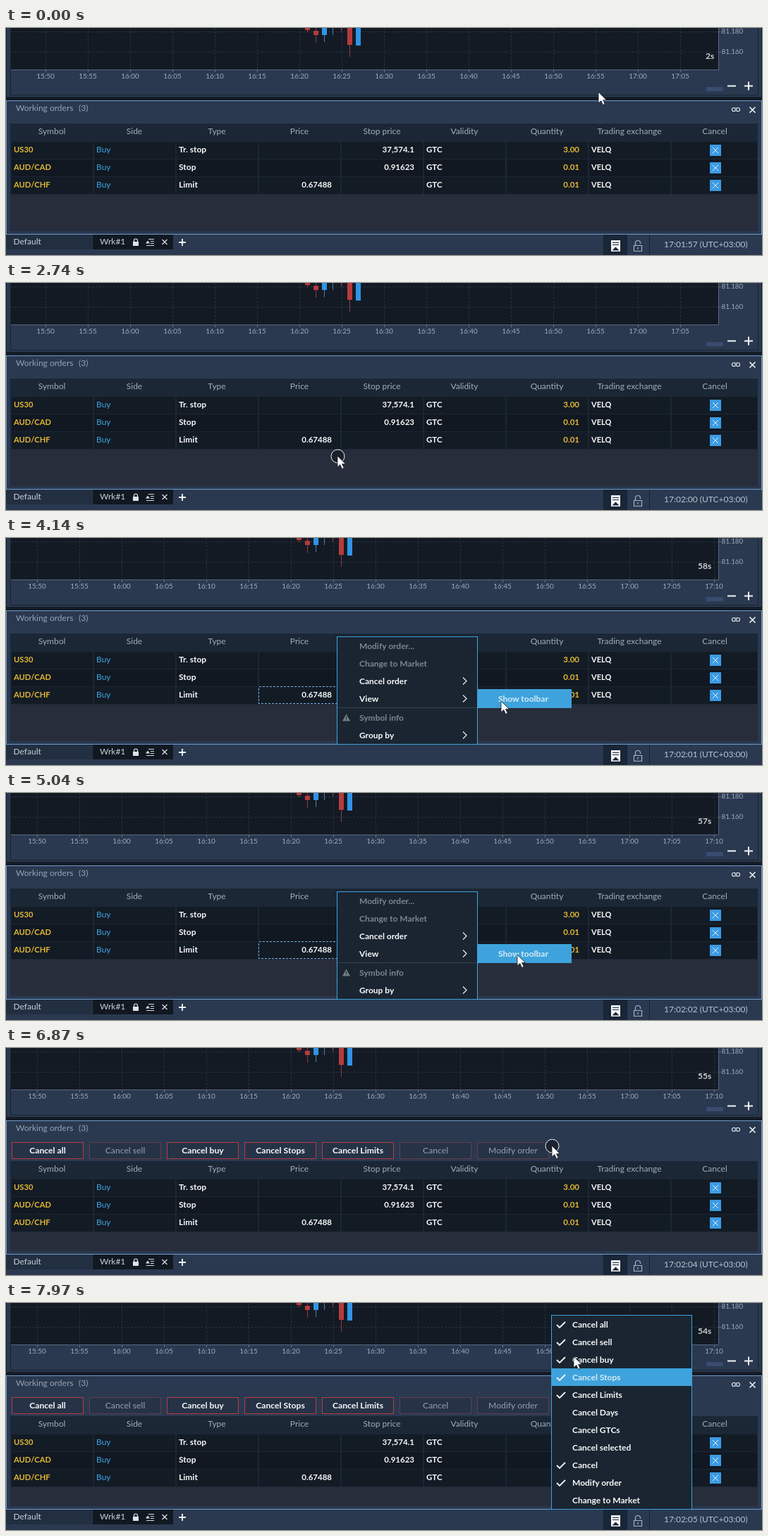
These frames come from a looping animation (1072x323 px, 8000 ms). An HTML page:

```html
<!DOCTYPE html>
<html lang="en">
<head>
<meta charset="utf-8">
<title>Working orders</title>
<style>
  html, body { margin: 0; width: 100%; height: 100%; overflow: hidden; background: #2a3950; }
  svg { display: block; width: 1072px; height: 323px; }
  text { font: 12px Lato, "Open Sans", sans-serif; white-space: pre; }
  rect { shape-rendering: crispEdges; }
</style>
</head>
<body>
<svg id="stage" viewBox="0 0 1072 323"></svg>
<script>
const LOOP = 8000;
const stage = document.getElementById('stage');

function add(parent, tag, attrs) {
  const el = document.createElementNS('http://www.w3.org/2000/svg', tag);
  for (const k in attrs) el.setAttribute(k, attrs[k]);
  parent.appendChild(el);
  return el;
}
const group = (parent = stage) => add(parent, 'g', {});
const rect = (p, x, y, width, height, fill, more) => add(p, 'rect', { x, y, width, height, fill, ...more });
const box = (p, x, y, w, h, fill, stroke, more) => rect(p, x + .5, y + .5, w - 1, h - 1, fill, { stroke, ...more });
const path = (p, d, stroke, width = 1, more) =>
  add(p, 'path', { d, stroke, 'stroke-width': width, fill: 'none', ...more });
const shape = (p, d, fill) => add(p, 'path', { d, fill });
function text(p, str, x, y, fill, { bold, size = 12, anchor = 'start' } = {}) {
  const el = add(p, 'text', { x, y, fill, 'text-anchor': anchor });
  el.style.fontSize = size + 'px';
  if (bold) el.style.fontWeight = 700;
  el.textContent = str;
  return el;
}
const cross = (p, x, y, r, color, w) =>
  path(p, `M${x - r} ${y - r}l${2 * r} ${2 * r}m0 ${-2 * r}l${-2 * r} ${2 * r}`, color, w);
const plus = (p, x, y, r, w) => path(p, `M${x - r} ${y}h${2 * r}M${x} ${y - r}v${2 * r}`, '#f2f5f8', w);
const show = (el, on) => { el.style.display = on ? '' : 'none'; };
const between = (t, a, b) => t >= a && t < b;

// Chart
const AXIS = '#a0abb8', GRID = '#26333b';
const chart = group();
box(chart, 0, -2, 1072, 101, '#2a3950', '#141b25');
path(chart, 'M6.5 0V95.5H1066.5V0', '#192431');
rect(chart, 7, 0, 1003, 59, '#131a24');
const clip = add(stage, 'clipPath', { id: 'plot' });
rect(clip, 7, 0, 1003, 59, '#fff');
path(chart, 'M7 5.5H1010M7 34.5H1010', GRID, 1, { 'stroke-dasharray': '3 2' });
const plot = group(add(chart, 'g', { 'clip-path': 'url(#plot)' }));
const axis = group(chart);
let lastLabel;
for (let i = 0; i <= 16; i++) {
  const x = 56 + 60 * i, min = 950 + 5 * i;
  path(plot, `M${x + .5} 0V60`, GRID, 1, { 'stroke-dasharray': '3 2' });
  lastLabel = group(axis);
  path(lastLabel, `M${x + .5} 60v3`, '#65758a');
  const label = Math.floor(min / 60) + ':' + String(min % 60).padStart(2, '0');
  text(lastLabel, label, x, 72, AXIS, { size: 10, anchor: 'middle' });
}
const RED = '#b63b3c', BLUE = '#3094e6';
// centre x, body top, body bottom, wick bottom, colour
for (const [x, top, bottom, low, color] of [
  [427, -5, 3, 6, RED], [439, 4, 10, 21, RED], [451, -5, 10, 20, BLUE], [463, -5, -1, 10, BLUE],
  [475, -5, -1, 5, RED], [487, -5, 24, 41, RED], [499, -5, 25, 25, BLUE]]) {
  path(plot, `M${x + .5} 0V${low}`, color === RED ? '#8f3d42' : '#4480b3');
  rect(plot, x - 3, top, 7, bottom - top, color);
}
path(chart, 'M7 59.5H1010.5V0M1010 5.5h4M1010 34.5h4', '#59687b');
text(chart, '81.180', 1014.5, 7.5, AXIS, { size: 9.8 });
text(chart, '81.160', 1014.5, 36.5, AXIS, { size: 9.8 });
const timer = text(chart, '', 992, 44, '#cdd2d8', { bold: true });
rect(chart, 993, 84, 24, 6, '#3a4b70');
path(chart, 'M1023 82.5h12', '#f2f5f8', 2);
plus(chart, 1053, 82.5, 6, 2);
rect(chart, 0, 98, 1072, 5, '#141b25');

// Orders panel
const panel = group();
box(panel, 0, 103, 1072, 191, '#2a3950', '#6f9ccb');
text(panel, 'Working orders', 14, 118, '#97a3b2');
text(panel, '(3)', 103, 118, '#97a3b2');
path(panel, 'M1034 113.5h-2a2.5 2.5 0 0 0 0 5h2M1036 113.5h2a2.5 2.5 0 0 1 0 5h-2M1034 113.5v5M1036 113.5v5', '#e3e8ee', 1.2);
cross(panel, 1058.5, 116.5, 4, '#f2f5f8', 1.6);
rect(panel, 6, 136, 1060, 153, '#282d3b');

const toolbar = group();
rect(toolbar, 6, 132, 1060, 30, '#2a3950');
['Cancel all', 'Cancel sell', 'Cancel buy', 'Cancel Stops', 'Cancel Limits', 'Cancel', 'Modify order'].forEach((name, i) => {
  const off = i === 1 || i > 4, x = 8 + 110 * i;
  box(toolbar, x, 134, 102, 24, '#263347', off ? '#683c4a' : '#b93b40', { rx: 1 });
  text(toolbar, name, x + 51, 150, off ? '#959fac' : '#f8f9fa', { bold: !off, anchor: 'middle', size: 12.2 });
});

const table = group();
const edges = [7, 124, 241, 358, 475, 592, 709, 826, 943, 1066];
rect(table, 6, 136, 1060, 101, '#1b2735');
['Symbol', 'Side', 'Type', 'Price', 'Stop price', 'Validity', 'Quantity', 'Trading exchange', 'Cancel'].forEach((name, i) =>
  text(table, name, (edges[i] + edges[i + 1]) / 2 + (i < 8 ? -.5 : .5), 151, '#a2adba', { anchor: 'middle' }));
[['US30', 'Tr. stop', '', '37,574.1', '3.00'],
 ['AUD/CAD', 'Stop', '', '0.91623', '0.01'],
 ['AUD/CHF', 'Limit', '0.67488', '', '0.01']].forEach(([symbol, type, price, stop, qty], r) => {
  const y = 162 + 25 * r, base = y + 15;
  edges.slice(0, 9).forEach((x, i) => rect(table, x + 1, y, edges[i + 1] - x - 2, 24, r % 2 ? '#111821' : '#131b25'));
  const bold = true, white = '#f8f9fa', gold = '#e3b834';
  text(table, symbol, 11, base, gold, { bold, size: 11.2 });
  text(table, 'Buy', 128, base, '#3da5e2');
  text(table, type, 245, base, white, { bold });
  text(table, price, 462, base, white, { bold, size: 11.5, anchor: 'end' });
  text(table, stop, 579, base, white, { bold, size: 11.5, anchor: 'end' });
  text(table, 'GTC', 596, base, white, { bold, size: 11.5 });
  text(table, qty, 813, base, gold, { bold, size: 11.5, anchor: 'end' });
  text(table, 'VELQ', 830, base, white, { bold, size: 11 });
  rect(table, 998, y + 4, 16, 16, '#3c9be4', { rx: 1 });
  cross(table, 1006, y + 12, 4, '#e0effb', 1);
});
const selection = box(table, 358, 211, 117, 25, 'none', '#78afe0', { 'stroke-dasharray': '3 2' });

// Menus
const ACCENT = '#3ea3dc', MENU = '#1a2531';
function menu(x, y, w, h) {
  const g = group();
  box(g, x, y, w, h, MENU, ACCENT);
  g.mark = rect(g, x + 1, y + 1, w - 2, 25, ACCENT);
  return g;
}
const orderMenu = menu(469, 140, 200, 154);
orderMenu.mark.setAttribute('y', 216);
[['Modify order...', 158], ['Change to Market', 183], ['Cancel order', 208, 1], ['View', 233, 1],
 ['Symbol info', 260], ['Group by', 285, 1]].forEach(([name, y, on]) => {
  text(orderMenu, name, 501, y, on ? '#f8f9fa' : '#7b8691', { bold: true });
  if (on) path(orderMenu, `M648 ${y - 9.5}l5 5l-5 5`, '#e3e8ee', 1.3);
});
path(orderMenu, 'M470 241.5H668', '#35424f');
shape(orderMenu, 'M482.5 250.5l5.5 10h-11z', '#747e88');
path(orderMenu, 'M482.5 254v3m0 1v1.3', MENU, 1.2);

const subMenu = menu(668, 215, 134, 27);
const subText = text(subMenu, 'Show toolbar', 698, 233, '#d5eaf6', { bold: true });

const buttonMenu = menu(773, 17, 200, 277);
const buttonItems = ['Cancel all', 'Cancel sell', 'Cancel buy', 'Cancel Stops', 'Cancel Limits', 'Cancel Days',
  'Cancel GTCs', 'Cancel selected', 'Cancel', 'Modify order', 'Change to Market'].map((name, i) => {
  const y = 35 + 25 * i;
  if (i < 5 || i === 8 || i === 9) path(buttonMenu, `M781 ${y - 4}l4 4l8 -8`, '#f4f6f8', 1.8);
  return text(buttonMenu, name, 803, y, '#f8f9fa', { bold: true });
});

// Bottom bar
const bar = group();
rect(bar, 0, 294, 1072, 29, '#2a3950');
rect(bar, 0, 294, 122, 21, '#222f41');
rect(bar, 123, 294, 114, 21, '#111821');
text(bar, 'Default', 10.5, 308, '#c8d0d9');
text(bar, 'Wrk#1', 133, 308, '#c8d0d9');
rect(bar, 180, 304, 8, 6, '#dfe4ea');
path(bar, 'M181.5 304v-1.5a2.5 2.5 0 0 1 5 0v1.5', '#dfe4ea', 1.2);
path(bar, 'M202 300.5h8M205 303.5h5M205 306.5h5M199 309.5h11', '#d6dce3', 1.2);
shape(bar, 'M198 306.5l3 -4l3 4z', '#d6dce3');
cross(bar, 225, 304.5, 3.5, '#dfe4ea', 1.2);
plus(bar, 250, 305, 5, 1.8);
const ACTIVE = '#1a2536';
rect(bar, 848, 294, 32, 29, ACTIVE);
for (const x of [847, 880, 912]) path(bar, `M${x + .5} 294V323`, '#172231');
rect(bar, 858, 302, 13, 16, '#f2f5f8');
path(bar, 'M860 305.5h9M860 308.5h9', ACTIVE);
shape(bar, 'M864.5 311.500l5 5h-10z', ACTIVE);
path(bar, 'M890.5 309.5h11v8h-11zM892.5 309.5v-3.5a3.5 3.5 0 0 1 7 0v1M896 312v3', '#a6b3c2', 1.2);
const clock = text(bar, '', 933, 312, '#b9c3ce');

// Pointer
const pointer = group();
const ring = add(pointer, 'circle', { cx: .5, cy: .5, r: 9.5, fill: '#10151d', 'fill-opacity': .6, stroke: '#eef2f6' });
path(pointer, 'M0 0V16L3.8 12.5L6.5 18.5L9.2 17.3L6.6 11.5H11.5Z', '#151a22', .8, { style: 'fill:#fff' });

const route = [
  [0, 840, 91], [1360, 840, 91], [1530, 677, 141], [1770, 677, 141], [2560, 470, 246], [3000, 470, 246],
  [3800, 640, 232], [4140, 702, 232], [4600, 709, 235], [5280, 732, 228], [6170, 732, 228],
  [6800, 774, 139], [7680, 774, 139], [7990, 805, 75], [LOOP, 805, 75]];
function pointerAt(t) {
  const i = route.findIndex(k => k[0] > t);
  const [t0, x0, y0] = route[i - 1], [t1, x1, y1] = route[i];
  const u = (t - t0) / (t1 - t0), e = u * u * (3 - 2 * u);
  return [x0 + (x1 - x0) * e, y0 + (y1 - y0) * e];
}

const clockTicks = [650, 1780, 2680, 3650, 4600, 5600, 6500, 7450];
const barTicks = [3690, 4690, 5680, 6680, 7690];
const NEW_BAR = 3130;
const passed = (ticks, t) => ticks.filter(k => t >= k).length;

function update(t) {
  const [x, y] = pointerAt(t);
  pointer.setAttribute('transform', `translate(${Math.round(x)} ${Math.round(y)})`);
  show(ring, between(t, 2630, 2850) || between(t, 5190, 5310) || between(t, 6810, 6990));

  const sec = 57 + passed(clockTicks, t);
  clock.textContent = `17:0${1 + Math.floor(sec / 60)}:${String(sec % 60).padStart(2, '0')} (UTC+03:00)`;

  const shifted = t >= NEW_BAR;
  for (const g of [plot, axis]) g.setAttribute('transform', `translate(${shifted ? -12 : 0} 0)`);
  show(lastLabel, shifted);
  timer.setAttribute('x', shifted ? 981 : 992);
  timer.textContent = shifted ? 59 - passed(barTicks, t) + 's' : t < 1160 ? '2s' : t < 2170 ? '1s' : '';

  const tools = t >= 5640;
  show(toolbar, tools);
  table.setAttribute('transform', `translate(0 ${tools ? 25 : 0})`);
  show(selection, between(t, 2790, 6810));

  const open = between(t, 2790, 5640), onSub = x >= 668;
  show(orderMenu, open);
  show(orderMenu.mark, !onSub && y < 241);
  show(subMenu, open && t >= 3480);
  show(subMenu.mark, onSub);
  subText.setAttribute('fill', onSub ? '#d5eaf6' : '#f8f9fa');

  show(buttonMenu, t >= 6960);
  const row = t < 7770 ? -1 : t < 7860 ? 4 : 3;
  show(buttonMenu.mark, row >= 0);
  buttonMenu.mark.setAttribute('y', 18 + 25 * row);
  buttonItems.forEach((el, i) => el.setAttribute('fill', i === row ? '#d5eaf6' : '#f8f9fa'));
}

const start = performance.now();
function tick() {
  update((performance.now() - start) % LOOP);
  requestAnimationFrame(tick);
}
tick();
</script>
</body>
</html>
```
